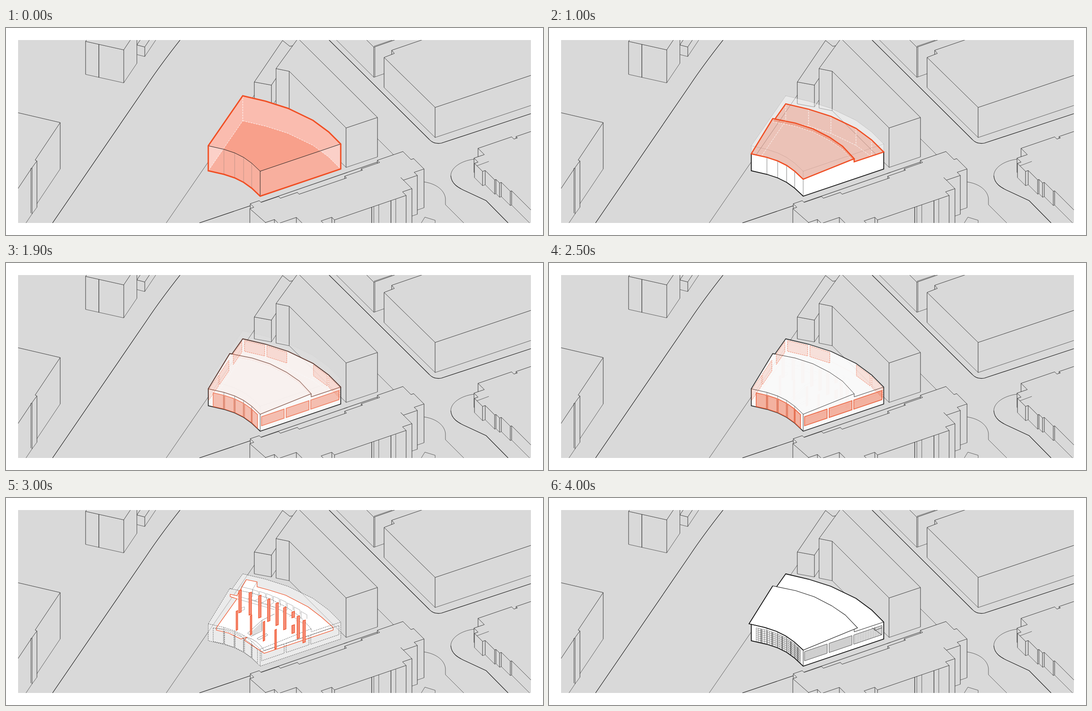
Write an HTML page that moves like this. It is 1200x464 px and loops after 6 s.

```html
<!DOCTYPE html>
<html lang="en">
<head>
<meta charset="utf-8">
<title>Massing study</title>
<style>
  html, body { margin: 0; width: 100%; height: 100%; overflow: hidden; background: #fff; }
  svg { display: block; width: 100%; height: 100%; }
</style>
</head>
<body>
<svg id="stage" viewBox="0 0 1200 464"></svg>
<script>
const ORANGE = '#f04e23', INK = '#1a1a1a', GROUND = '#d9d9d9';

// Points and paths
const pts = text => text.split(' ').map(p => p.split(',').map(Number));
const shift = (list, dy) => list.map(([x, y]) => [x, y + dy]);
const back = list => [...list].reverse();
const range = (n, make) => Array.from({ length: n }, (_, i) => make(i));
const line = list => 'M' + list.map(p => p.join(' ')).join('L');
const shape = list => line(list) + 'Z';
const path = (d, fill, stroke, width = 1, extra = '') =>
  `<path d="${d}" fill="${fill || 'none'}" stroke="${stroke || 'none'}" stroke-width="${width}" ${extra}/>`;
const stroke = (d, color = INK, width = .7, dash = '') =>
  path(d, 'none', color, width, dash && `stroke-dasharray="${dash}"`);
const fill = (d, color, opacity = 1) => path(d, color, '', 0, `fill-opacity="${opacity}"`);
const heightAt = (list, x) => {
  let i = 1;
  while (i < list.length - 1 && list[i][0] < x) i++;
  const [[x0, y0], [x1, y1]] = [list[i - 1], list[i]];
  return y0 + (y1 - y0) * (x - x0) / (x1 - x0);
};

// A solid extruded down from its roof; nearer faces cover farther ones.
function block(roof, height) {
  const depth = ([a, b]) => a[1] + b[1];
  const faces = roof.map((p, i) => [p, roof[(i + 1) % roof.length]]).sort((a, b) => depth(a) - depth(b));
  return [...faces.map(edge => [...edge, ...back(shift(edge, height))]), roof]
    .map(face => path(shape(face), GROUND, INK, .65)).join('');
}

// A stepped outline: moves alternate between the two street directions.
function stepped([x, y], moves) {
  return [[x, y], ...moves.map((n, i) => {
    x += n;
    y += i % 2 ? n : -.343 * n;
    return [x, y];
  })];
}

function drawSite() {
  const terrace = stepped([545, 405], [9, -8, 20, 4, 39, 4, 38, 4, 106, -4, 40, -3, 41, -5, 57, 18, 6, 23,
    -22, 7, -31, -6, 0, 25, -21, 8, -34, 0, -43, 0, -83, -6, -24, 12, -35, -32, -40, -9, -20]);
  const row = stepped([1173, 232], [-33, 3, -8, -5, -75, 14, -23, 9, -8, 18, 6, 21, 3, 8, 4, 20, 3, 70]);
  const thin = 'M358 437L560 143M830 248L865 283V289L861 291M934 345C962 349 980 364 982 382V396L1023 437M1046 294C1015 298 994 314 994 331';
  const curbs = 'M389 27Q345 83 315 128L104 437M722 27L946 250Q956 261 973 258L1173 192M432 437L568 391M994 331C995 349 1010 358 1028 366L1073 387L1122 437';
  return '<rect width="1200" height="464" fill="#fff"/>'
    + `<clipPath id="plot"><rect x="27" y="27" width="1146" height="410"/></clipPath>
    <g clip-path="url(#plot)"><rect width="1200" height="464" fill="${GROUND}"/>`
    + stroke(thin, INK, .65) + stroke(curbs, '#111', 1.1) + stroke('M568 391L866 288', '#444', 1.2)
    + block(pts('292.5,38 310,42.5 335,5 318,0'), 21.5)
    + block(pts('178,30 263,49 292.5,5 207,-14'), 74)
    + block(pts('-20,180 27,190 121,212 65,296 69,298 58,313 20,370'), 104)
    + block(pts('618,28 555,121 593,128 654,38 634,41'), 49)
    + block(pts('652.5,23.5 603.5,91 633,97 760,224 830,200.5'), 88.5)
    + block(pts('738,-41 822,43 945,0 860,-85'), 67.5)
    + block(pts('845,66 959,178 1200,97 1200,-64 926,28 862,50 868,57'), 67.5)
    + block([...row, [1300, 437], [1300, 190]], 32)
    + block(terrace, 87)
    + stroke('M55.500 314V415M824.500 43V110M822 41L863 27M1052 309L1079 299M822 400V437M833 396V437M871 384V437M928 437L936 424L959 431V437', INK, .65)
    + stroke('M207.500 37V111', INK, 1.1) + '</g>';
}

// The volume: ground curves, raised to each roof level
const outer = pts('529,208 580,220 630,236 686,263 721,289 748,316');
const inner = pts('452,320 487,328 511,336 531,346 549,359 568,377');
const ridge = pts('500,203 550,213 590,226 627,245 656,265 682,293');
const front = pts('568,377 748,316');
const rear = [[452, 320], ...outer];
const FULL = -56, LOW = -38;
const ground = [...outer, ...back(inner)];
const highTop = shift(ground, FULL);
const highHull = [...shift(outer, FULL), [748, 316], ...back(inner), [452, 264]];
const lowOuter = shift(outer, LOW), lowInner = shift(inner, LOW);
const underRidge = shift(ridge, 7);
const frontRoof = [...ridge, ...back(lowInner)];
const rearRoof = [...lowOuter, ...back(underRidge), [505, 204]];
const hull = [...lowOuter, [748, 316], ...back(inner), [452, 282], [500, 203], [505, 204]];
const eaves = [...lowInner, [682, 293], [682, 300], [748, 278]];
const walls = [...eaves, [748, 316], ...back(inner)];
const innerPosts = (rise, color, dash) =>
  stroke(inner.slice(1, 5).map(([x, y]) => `M${x} ${y + rise}V${y}`).join(''), color, .7, dash);

// Windows follow the ground curve below them.
const panesAlong = (curve, spans, top, foot) => spans.map(([a, b]) => {
  const mid = curve.filter(([x]) => x > a && x < b).map(p => p[0]);
  return { base: [a, ...mid, b].map(x => [x, heightAt(curve, x)]), top, foot };
});
const facade = panesAlong(inner, pts('463,486 488.5,509.5 512,530.5 533,548 550,562'), -31.5, -1);
const side = panesAlong(front, pts('571,621.5 626,677 681,744'), -31.5, -11);
const hidden = panesAlong(rear, pts('453,475 477,498 508,527 533,578 583,627.5 687,718 721,746'), -35, -11);
const pane = ({ base, top, foot }) => shape([...shift(base, top), ...back(shift(base, foot))]);
const outlines = list => list.map(pane).join('');
const grid = ({ base, top, foot }, cols, rows) => {
  const a = base[0][0], b = base[base.length - 1][0];
  const bars = range(cols - 1, i => {
    const x = a + (b - a) * (i + 1) / cols, y = heightAt(base, x);
    return `M${x} ${y + top}V${y + foot}`;
  });
  return bars.join('') + range(rows - 1, i => line(shift(base, top + (foot - top) * (i + 1) / rows))).join('');
};

function fullVolume() {
  return fill(shape(highHull), '#fbd0c8') + fill(shape(highTop), ORANGE, .15) + fill(shape(ground), ORANGE, .25)
    + stroke(line(outer) + 'M529 152V208L452 320', '#fff', 1, '4 2') + innerPosts(FULL, '#a98880')
    + stroke(line([...shift(inner, FULL), [748, 260]]) + 'M568 321V377', INK, 1)
    + stroke(shape(highHull), ORANGE, 3);
}

function steppedRoof() {
  const drops = outer.slice(0, 5).map(([x, y]) => `M${x} ${y + LOW}V${y}`).join('');
  return fill(shape(highHull), '#fff', .4) + fill(shape(walls), '#fff')
    + stroke(shape(highTop) + 'M452 264V282M748 260V278M568 321V339', '#999', .8, '1.5 1.5')
    + fill(shape(rearRoof), ORANGE, .25) + fill(shape(frontRoof), ORANGE, .25)
    + stroke(line(outer) + drops + 'M529 208L475 287' + line(underRidge), '#fff', 1, '4 2')
    + innerPosts(LOW, '#444') + stroke('M568 339V377', '#444')
    + stroke(line([[452, 282], ...inner, [748, 316], [748, 278]]), '#111', 1.8)
    + stroke(line([[505, 204], ...lowOuter, [682, 300], [682, 293]]) + shape(frontRoof), ORANGE, 2.7);
}

function openings() {
  return fill(shape(hull), '#fff') + stroke(shape(hull), '#111', 1.8)
    + stroke(line(ridge) + line(eaves) + 'M568 339V377', INK, 1) + innerPosts(LOW, '#444')
    + path(outlines(hidden), ORANGE, ORANGE, 1, 'fill-opacity=".17" stroke-opacity=".8" stroke-dasharray="3 1.5"')
    + path(outlines([...facade, ...side]), ORANGE, ORANGE, 1.6, 'fill-opacity=".48"');
}

function structure() {
  const slab = pts('537,183 561,188 561,199 590,207 625,218 675,244 705,267 731,290 731,296 577,348 533,319 538,312 525,316 498,303 470,296 470,291 516,226 501,221 501,216 516,219');
  const arc = x => 206 + .17 * (x - 523) + .0021 * (x - 523) ** 2;
  const rooms = range(8, i => {
    const x = 551 + 15.5 * i, y = arc(x) - 7 - i;
    return `M${x} ${y}v15l-11 6M${x} ${y}l13 ${4 + i * .5}v9M${x - 4} ${y + 22}l14 ${4 + i * .5}`;
  }).join('');
  const post = (x, top, length, w) =>
    `M${x - w / 2} ${top + 2}l${w} -2v${length - 2}l${-w} 2Z`;
  const tall = range(9, i => {
    const x = 523 + 23.5 * i - .7 * i * i;
    return i === 6 ? post(x + 3, arc(x), 15, 6) + post(x + 3, arc(x) + 30, 20, 6) : post(x, arc(x), 51.5, 5.5);
  });
  const short = range(4, i => post(516 + 33 * i - 1.4 * i * i, 252 + 8 * i + 2 * i * i, 45, 3.5));
  return fill(shape(hull), '#fff', .45) + fill(shape(slab), '#fff')
    + stroke(rooms + 'M537 183L526 199L551 205L561 188M551 205V216M526 199V219M516 219L600 245M516 226L600 250M525 247l8 -3v6l-8 3Z', '#777', .6)
    + fill('M543 305L572 277V296L552 308Z', '#ddd')
    + stroke('M540 303L572 274V298L548 310ZM561 315l21 -11l3 3l-20 11ZM572 274L600 260M470 291Q510 296 528 311M538 312Q562 318 577 342L731 290', '#555', .7)
    + stroke(shape(slab), ORANGE, 1.2)
    + stroke(shape(hull) + line(ridge) + line(eaves) + 'M568 339V377' + outlines([...facade, ...side]), '#333', .8, '2.5 1.7')
    + innerPosts(LOW, '#444', '2.5 1.7')
    + path([...tall, ...short].join(''), '#f5907b', ORANGE, 1.3);
}

function finished() {
  const eave = ridge.map(([x, y], i) => [x + 1.5 * i, y - 6 + .8 * i]);
  const gutter = lowInner.map(([x, y], i) => [x - 5 + i, y + .4 * i]);
  const roof = [...eave, ...back(gutter)];
  return fill(shape(hull), '#fff') + stroke(shape(hull), '#111', 1.8)
    + innerPosts(LOW, '#333') + stroke('M568 341V377M682 293V300L748 278', INK, 1)
    + stroke(outlines(facade) + facade.map(w => grid(w, 5, 7)).join(''), '#444', .65)
    + stroke(facade.map(w => grid(w, 2, 1)).join(''), '#222', 1)
    + stroke(side.map(w => grid(w, 17, 7)).join(''), '#666', .5)
    + stroke(outlines(side) + 'M722 291L744 307M728 290V297L744 291', '#222', .9)
    + fill(shape(roof), '#fff') + stroke(shape(roof), INK, 1.1)
    + stroke(line([eave[0], ...gutter]), '#111', 1.7);
}

const stage = document.getElementById('stage');
const scenes = [fullVolume, steppedRoof, openings, structure, finished];
stage.innerHTML = drawSite() + scenes.map(draw => `<g class="scene">${draw()}</g>`).reverse().join('');
const layers = back(stage.querySelectorAll('.scene'));

// Each scene fades out above the next, which fades in, in six steps of 100 ms.
const LOOP = 6000, HOLD = 500, PERIOD = 1000, STEPS = 6;
function render(time) {
  const t = time % LOOP;
  const entered = i => {
    const step = Math.floor((t - HOLD - (i - 1) * PERIOD) / 100) + 1;
    return i ? Math.max(0, Math.min(1, step / STEPS)) : 1;
  };
  layers.forEach((layer, i) => {
    const left = i < layers.length - 1 ? entered(i + 1) : 0;
    const opacity = entered(i) * (1 - left);
    layer.style.display = opacity ? '' : 'none';
    layer.style.opacity = opacity;
  });
}
const start = performance.now();
function tick() {
  render(performance.now() - start);
  requestAnimationFrame(tick);
}
tick();
</script>
</body>
</html>
```
